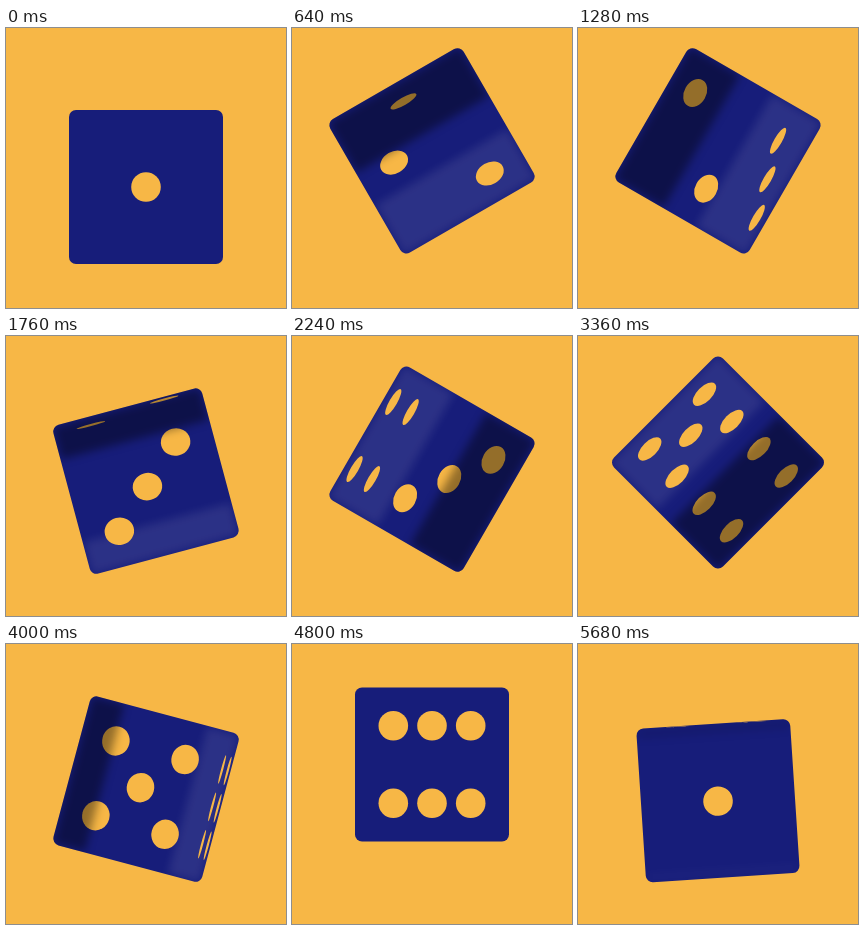
Write an HTML page with a canvas that moves like this. It is 280x280 px and loops after 5720 ms.

```html
<!DOCTYPE html>
<html lang="en">
<head>
<meta charset="utf-8">
<title>Rolling die</title>
<style>
html, body { margin: 0; width: 100%; height: 100%; overflow: hidden; background: #f7b746; }
canvas { display: block; }
</style>
</head>
<body>
<canvas id="stage" width="280" height="280"></canvas>
<script>
const ctx = document.getElementById('stage').getContext('2d');
const YELLOW = '#f7b746', BLUE = '#171d7a';
const STEP = 40, STEPS = 143, TURN = 24;
const HALF = 77, PIP = 14.8, GAP = 38.7;

// Pips in units of GAP
const FACES = [
  [[0, 0]],
  [[-1, -1], [1, 1]],
  [[1, -1], [0, 0], [-1, 1]],
  [[-1, -1], [1, -1], [-1, 1], [1, 1]],
  [[-1, -1], [1, -1], [0, 0], [-1, 1], [1, 1]],
  [[-1, -1], [0, -1], [1, -1], [-1, 1], [0, 1], [1, 1]]
];
// Side from which the next face enters
const SIDES = [1, 1, -1, -1, 1, 1];

const smooth = p => p * p * (3 - 2 * p);
const cubic = (a, b, s) => 3 * s * (1 - s) ** 2 * a + 3 * s * s * (1 - s) * b + s ** 3;

// Fast start, long soft arrival at the top
function rise(x) {
  let lo = 0, hi = 1;
  for (let i = 0; i < 24; i++) {
    const mid = (lo + hi) / 2;
    if (cubic(0.167, 0.2, mid) < x) lo = mid; else hi = mid;
  }
  return cubic(0.167, 1, lo);
}

function drawPips(pips, center, scale, quarterBack) {
  if (scale < 0.002) return;
  ctx.fillStyle = YELLOW;
  for (const [a, b] of pips) {
    const [x, y] = quarterBack ? [b, -a] : [a, b];
    ctx.beginPath();
    ctx.ellipse(center + x * GAP * scale, y * GAP, PIP * scale, PIP, 0, 0, Math.PI * 2);
    ctx.fill();
  }
}

// Soft strip along one edge of the die
function shade(side, width, color, alpha) {
  if (width < 0.5) return;
  const edge = HALF - 1;
  ctx.save();
  ctx.globalAlpha = alpha;
  ctx.fillStyle = color;
  ctx.filter = 'blur(4.5px)';
  ctx.fillRect(side > 0 ? edge - width : -edge, -edge, width, edge * 2);
  ctx.restore();
}

function draw(f) {
  const k = Math.floor(f / TURN) % 6;
  const p = f / TURN % 1;
  const s = smooth(p);
  const side = SIDES[k];
  const hop = 1 - Math.abs(f % 48 / TURN - 1);
  const width = 66 * Math.sin(Math.PI * p);
  const fade = Math.min(1, 6 * Math.min(p, 1 - p));

  ctx.fillStyle = YELLOW;
  ctx.fillRect(0, 0, 280, 280);
  ctx.save();
  ctx.translate(140, 159 - 38.5 * rise(hop));
  ctx.rotate(p * Math.PI / 2);
  ctx.beginPath();
  ctx.roundRect(-HALF, -HALF, HALF * 2, HALF * 2, 7);
  ctx.fillStyle = BLUE;
  ctx.fill();
  ctx.clip();
  shade(side, width, '#fff', 0.09 * fade);
  drawPips(FACES[k], -side * HALF * s, 1 - s, false);
  drawPips(FACES[(k + 1) % 6], side * HALF * (1 - s), s, true);
  shade(-side, width, '#000', 0.4 * fade);
  ctx.restore();
}

let start = null;
function tick(now) {
  if (start === null) start = now;
  const n = Math.floor((now - start) / STEP) % STEPS;
  // The last steps run slightly faster to close the loop
  draw(n <= 135 ? n : 135 + (n - 135) * 8 / 7);
  requestAnimationFrame(tick);
}
draw(0);
requestAnimationFrame(tick);
</script>
</body>
</html>
```
